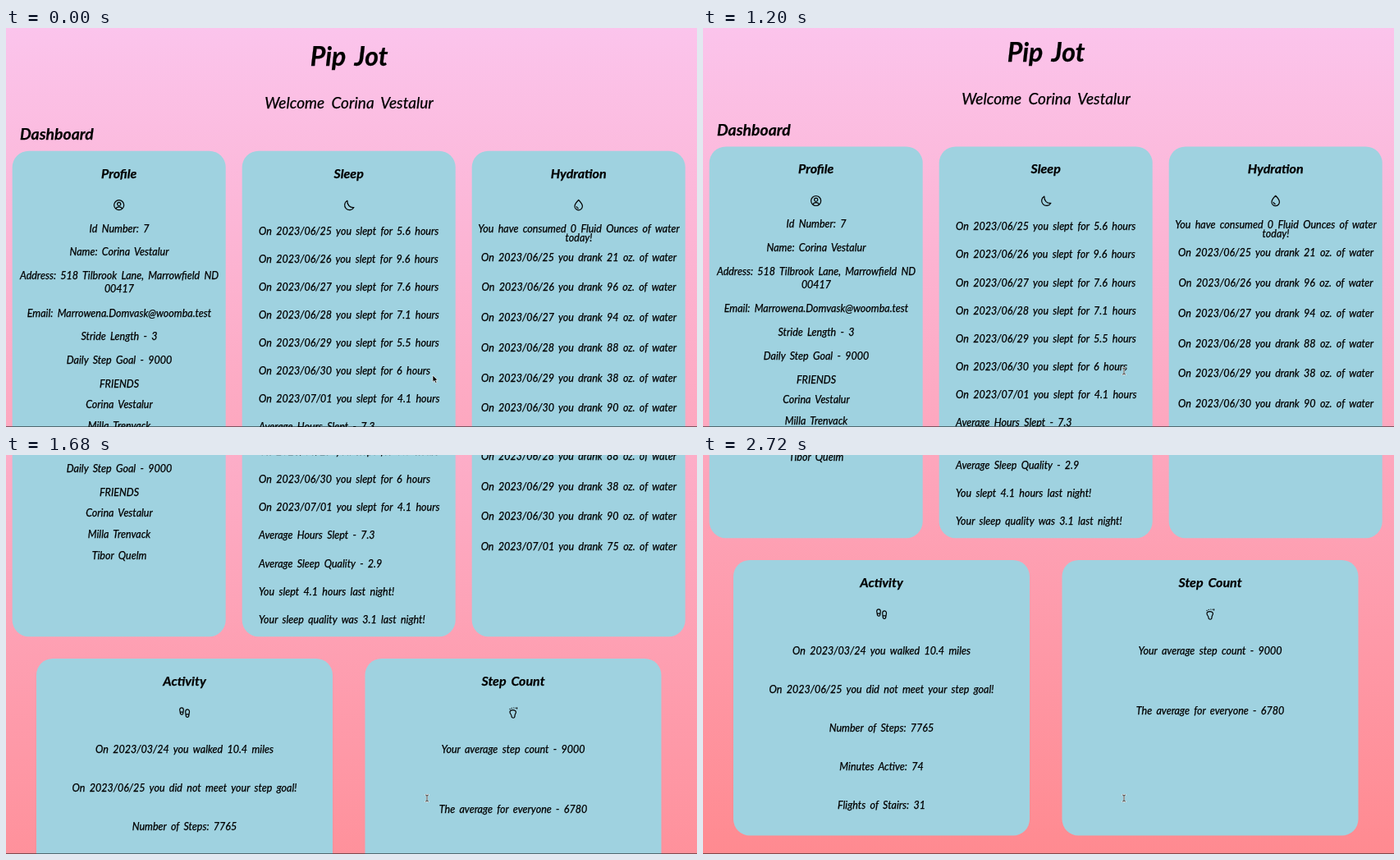
Recreate the animation shown at these times as an HTML page. Size 842 by 486 pixels, loop 2.8 s.

```html
<!DOCTYPE html>
<html lang="en">
<head>
<meta charset="utf-8">
<title>Dashboard</title>
<style>
  html, body { margin: 0; width: 100%; height: 100%; overflow: hidden; background: #fbc4ec; }
  svg { display: block; width: 842px; height: 486px; }
  text { font: italic 12.5px Lato, "Open Sans", sans-serif; word-spacing: 2.4px; stroke: #000; stroke-width: .25px; }
  .mid { text-anchor: middle; }
  .head { font-size: 16px; font-weight: 700; }
  .title { font-size: 32px; font-weight: 700; word-spacing: 4px; }
  .hello { font-size: 19px; word-spacing: 4px; }
  .board { font-size: 19.4px; font-weight: 700; }
  .icon { fill: none; stroke: #000; stroke-width: 1.2; stroke-linecap: round; stroke-linejoin: round; }
</style>
</head>
<body>
<svg viewBox="0 0 842 486" xmlns="http://www.w3.org/2000/svg">
  <defs>
    <linearGradient id="sky" gradientUnits="userSpaceOnUse" x1="0" y1="0" x2="0" y2="994">
      <stop offset="0" stop-color="#fbc4ec"/>
      <stop offset="1" stop-color="#ff8a90"/>
    </linearGradient>
  </defs>
  <g id="page"><rect width="842" height="996" fill="url(#sky)"/></g>
  <rect y="485" width="842" height="1" fill="#000" opacity=".5"/>
  <g id="pointer">
    <path id="arrow" d="M0 0V8.2L2 6.5 3.5 9.6 5 8.9 3.6 6H6.2Z" fill="#000" stroke="#fff" stroke-width=".7"/>
    <g id="beam" fill="none" stroke-linecap="round">
      <path d="M-1.6 -4Q0 -4 0 -3V3Q0 4 -1.6 4M1.6 -4Q0 -4 0 -3M0 3Q0 4 1.6 4" stroke="#fff" stroke-width="2"/>
      <path d="M-1.6 -4Q0 -4 0 -3V3Q0 4 -1.6 4M1.6 -4Q0 -4 0 -3M0 3Q0 4 1.6 4" stroke="#222" stroke-width=".9"/>
    </g>
  </g>
</svg>
<script>
const LOOP = 2800, STEP = 80;
const byId = id => document.getElementById(id);
const page = byId('page');

function add(tag, attrs, content = '') {
  const el = document.createElementNS('http://www.w3.org/2000/svg', tag);
  for (const key in attrs) el.setAttribute(key, attrs[key]);
  el.textContent = content;
  page.appendChild(el);
}

const text = (x, y, str, cls = 'mid') => add('text', { x, y, class: cls }, str);
const icon = (x, y, d) => add('path', { d, class: 'icon', transform: `translate(${x} ${y})` });

function column(x, y, gap, lines, cls) {
  lines.forEach((line, i) => text(x, y + i * gap, line, cls));
}

function card(x, y, width, height, heading, d) {
  const cx = x + width / 2;
  add('rect', { x, y, width, height, rx: 20, fill: '#9fd2e0' });
  text(cx, y + 33, heading, 'mid head');
  icon(cx, y + 66, d);
}

const days = ['2023/06/25', '2023/06/26', '2023/06/27', '2023/06/28',
  '2023/06/29', '2023/06/30', '2023/07/01'];
const user = 'Corina Vestalur';

const shapes = {
  face: 'M6 0A6 6 0 1 1 -6 0A6 6 0 1 1 6 0ZM2.1 -1.3A2.1 2.1 0 1 1 -2.1 -1.3A2.1 2.1 0 1 1 2.1 -1.3ZM-3.8 4.4Q-3 2.2 0 2.2T3.8 4.4',
  moon: 'M-1.8 -5.4A6 6 0 1 0 6.2 2.8Q2.8 3.4 .2 .8Q-2.2 -1.8 -1.8 -5.4Z',
  drop: 'M0 -6.2Q4.7 -1.6 4.7 1.4A4.7 4.7 0 0 1 -4.7 1.4Q-4.7 -1.6 0 -6.2ZM-2.5 1.8Q-2.2 3.6 -.5 3.9',
  steps: 'M-5.8 -3.6C-5.8 -7 -1.2 -7 -1.2 -3.4L-1.8 1.2A1.8 1.8 0 0 1 -5 1ZM-5.2 -.8H-1.7' +
    'M1.2 -1.2C1.2 -5 6 -5 6 -1.4L5.2 4A1.8 1.8 0 0 1 1.8 4.2ZM1.5 1.8H5.4',
  foot: 'M-4 -1C-4 -4 3.4 -4.4 3.4 -.8C3.4 1 1.8 1.8 2 3.8C2.2 7 -2 7 -2 4C-2 2 -4 1.4 -4 -1Z' +
    'M-4 -4.6h.1M-1.8 -5.6h.1M.6 -6h.1M2.8 -5.8h.1M4.6 -6.2v1.2'
};

text(418, 46, 'Pip Jot', 'mid title');
text(418, 98, 'Welcome ' + user, 'mid hello');
text(17, 136, 'Dashboard', 'board');

card(7.7, 149.7, 260, 459.5, 'Profile', shapes.face);
column(138, 248.5, 28.8, ['Id Number: 7', 'Name: ' + user, 'Address: 518 Tilbrook Lane, Marrowfield ND']);
text(138, 322, '00417');
column(138, 351.5, 28.8, ['Email: Marrowena.Domvask@woomba.test', 'Stride Length - 3',
  'Daily Step Goal - 9000', 'FRIENDS']);
column(138, 462.5, 26.1, [user, 'Milla Trenvack', 'Tibor Quelm']);

card(287.7, 149.7, 260, 459.5, 'Sleep', shapes.moon);
const slept = [5.6, 9.6, 7.6, 7.1, 5.5, 6, 4.1];
column(308, 251.5, 34.13, [
  ...days.map((day, i) => `On ${day} you slept for ${slept[i]} hours`),
  'Average Hours Slept - 7.3', 'Average Sleep Quality - 2.9',
  'You slept 4.1 hours last night!', 'Your sleep quality was 3.1 last night!'
], 'left');

card(567.7, 149.7, 260, 459.5, 'Hydration', shapes.drop);
const drunk = [21, 96, 94, 88, 38, 90, 75];
column(698, 249, 10.8, ['You have consumed 0 Fluid Ounces of water', 'today!']);
column(698, 283.5, 36.75, days.map((day, i) => `On ${day} you drank ${drunk[i]} oz. of water`));

card(37, 636, 361, 335.5, 'Activity', shapes.steps);
column(217.5, 750.5, 47.1, ['On 2023/03/24 you walked 10.4 miles',
  'On 2023/06/25 you did not meet your step goal!', 'Number of Steps: 7765',
  'Minutes Active: 74', 'Flights of Stairs: 31']);

card(437.5, 636, 361, 335.5, 'Step Count', shapes.foot);
column(618, 750.5, 73.4, ['Your average step count - 9000', 'The average for everyone - 6780']);

// Two flicks of the scroll wheel: [ms, px]
const scroll = [[1120, 0], [1200, 5.2], [1280, 92], [1360, 175], [1440, 228], [1520, 264],
  [1600, 306], [1680, 388], [1760, 490], [1840, 505], [1920, 508]];

function scrollAt(t) {
  const n = scroll.findIndex(key => key[0] > t);
  if (n === 0) return 0;
  if (n < 0) return 508;
  const [t0, y0] = scroll[n - 1], [t1, y1] = scroll[n];
  return y0 + (y1 - y0) * (t - t0) / (t1 - t0);
}

function draw(now) {
  const t = Math.floor((now % LOOP) / STEP) * STEP;
  const p = Math.min(1, Math.max(0, (t - 720) / 400));
  const ease = p * p * (3 - 2 * p);
  const x = 520 - 7 * ease, y = 423 - 5 * ease;
  const typing = x < 517;
  page.setAttribute('transform', `translate(0 ${-scrollAt(t)})`);
  byId('pointer').setAttribute('transform', `translate(${x} ${y})`);
  byId('arrow').setAttribute('visibility', typing ? 'hidden' : 'visible');
  byId('beam').setAttribute('visibility', typing ? 'visible' : 'hidden');
}

const start = performance.now();
function tick() {
  draw(performance.now() - start);
  requestAnimationFrame(tick);
}
tick();
</script>
</body>
</html>
```
